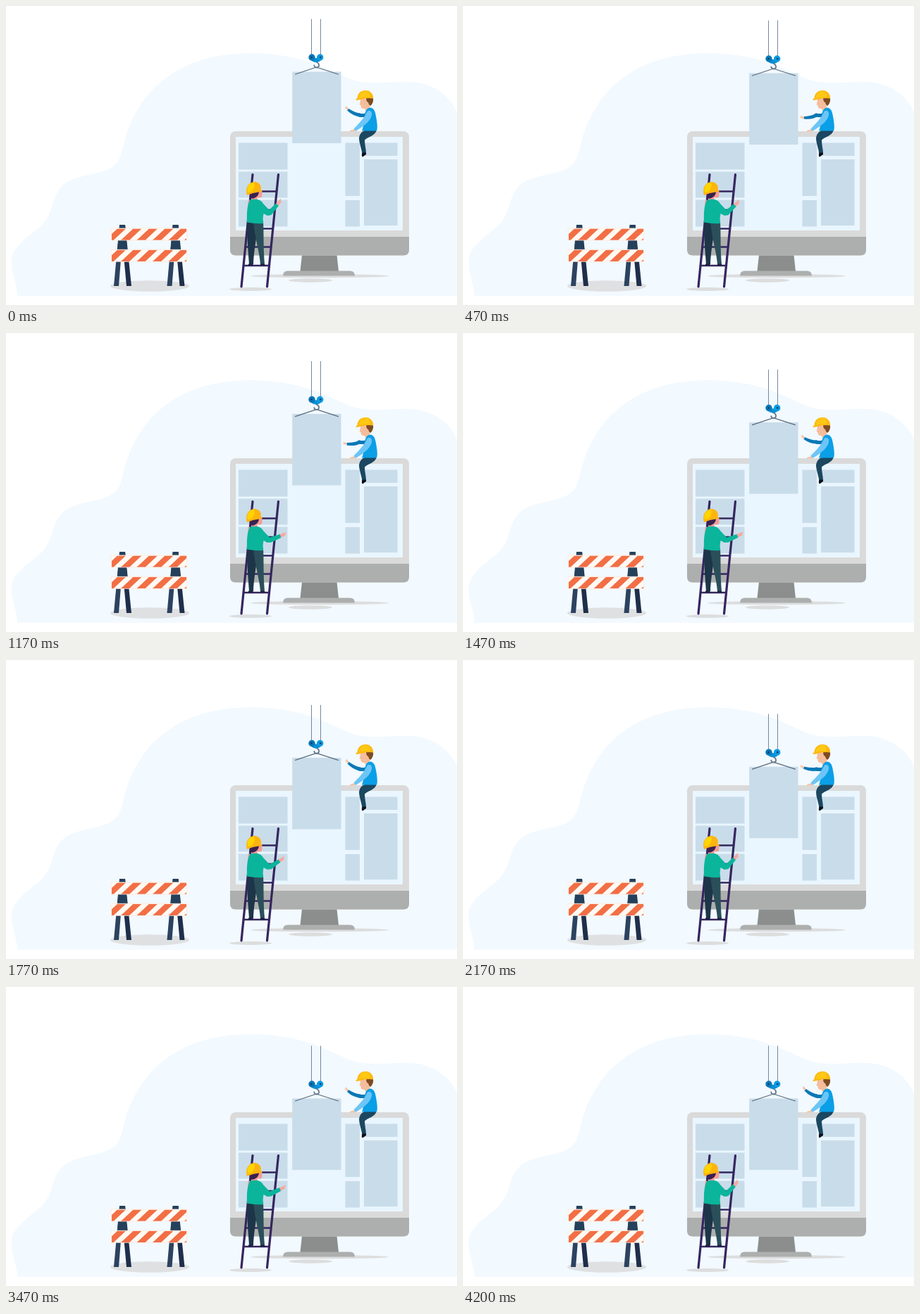
Animation of 640 by 425 pixels, one loop 4.36 s. Source, as an HTML page:

```html
<!DOCTYPE html>
<html lang="en">
<head>
<meta charset="utf-8">
<title>Building a page</title>
<style>
  html, body { margin: 0; width: 100%; height: 100%; overflow: hidden; background: #fff; }
  svg { display: block; width: 640px; height: 425px; }
</style>
</head>
<body>
<svg viewBox="0 0 640 425" fill="none" stroke-linecap="round" stroke-linejoin="round">
  <defs>
    <g id="legs">
      <path fill="#2c425f" d="M161 311H167L160 398H153Z"/>
      <path fill="#1f2e4a" d="M163 311H169L178 398H171Z"/>
      <path fill="#25405b" d="M161.500 311H169L172 347H158Z"/>
    </g>
    <clipPath id="boardClip"><path d="M150 316.500H256V332.500H150Z"/></clipPath>
    <g id="board">
      <path fill="#fffaf4" stroke="#fbe9d6" stroke-width=".8" d="M149.500 316H256.500V333H149.500Z"/>
      <g clip-path="url(#boardClip)">
        <path id="stripes" fill="#f26f46"/>
        <path stroke="#ea5238" stroke-width="1" stroke-dasharray="12 10.500" d="M141 332.300H256" stroke-linecap="butt"/>
      </g>
    </g>
  </defs>

  <path fill="#f2f9ff" d="M16 412C17 398 8 385 8 362C8 340 39 324 52 310C71 289 62 270 84 252C108 236 143 242 158 222C171 204 162 180 199 129C240 79 298 67 350 67C440 69 468 101 500 107C525 112 545 107 575 108C612 110 634 134 640 152V412Z"/>

  <!-- barrier -->
  <ellipse cx="204" cy="398" rx="56" ry="7.800" fill="#dfe0e1"/>
  <use href="#legs"/>
  <use href="#legs" x="75.500"/>
  <use href="#board"/>
  <use href="#board" y="30.300"/>

  <!-- monitor -->
  <g fill="#dcdddd">
    <ellipse cx="445" cy="383.700" rx="98" ry="2.600"/>
    <ellipse cx="432" cy="390" rx="31" ry="2.800"/>
    <ellipse cx="347" cy="402.500" rx="30" ry="2.500"/>
  </g>
  <path fill="#8b8e8d" d="M420 354H469.500L472 377H417.500Z"/>
  <path fill="#adafae" d="M393 383.500Q393 376.500 400 376.500H488Q495 376.500 495 383.500Z"/>
  <rect x="318" y="178" width="254" height="176.500" rx="8" fill="#dadada"/>
  <path fill="#adafae" d="M318 328H572V346.500Q572 354.500 564 354.500H326Q318 354.500 318 346.500Z"/>
  <path fill="#e9f6ff" d="M326 186H563V319H326Z"/>
  <path fill="#c9dcea" d="M330 194.500H399.500V232.500H330ZM330 235.500H399.500V272.500H330ZM330 275.500H399.500V313.500H330ZM481.500 194.500H502V270H481.500ZM481.500 276H502V313.500H481.500ZM508 194.500H555.500V213H508ZM508 218H555.500V312H508Z"/>

  <!-- crane load -->
  <g id="load">
    <path fill="#c9dcea" d="M406.200 93.500H475.500V195H406.200Z"/>
    <path stroke="#75889c" stroke-linecap="butt" d="M433.500 18.500V70M446.500 18.500V70"/>
    <path stroke="#596a7c" stroke-width="1.200" d="M410.500 97L440.500 87L471.500 97"/>
    <path stroke="#66788b" stroke-width="1.800" d="M440 79.500C445 81 445.500 87 441 87.500C438.500 87.500 437.500 86 437.300 84.500"/>
    <path fill="#0a8fd4" d="M432 76Q436 73 440 74Q444 73 448 76Q445 80 440 80Q435 80 432 76Z"/>
    <circle cx="434" cy="73" r="4.700" fill="#0878b8"/>
    <circle cx="445.700" cy="73" r="4.700" fill="#0a9be4"/>
    <path stroke="#14395c" stroke-width="2.600" d="M433.500 73h0M446.300 73h0"/>
  </g>

  <!-- seated man -->
  <path stroke="#0a78b6" stroke-width="5" d="M513 154Q508 156.500 501 155"/>
  <g id="manArm">
    <path fill="#0a78b6" d="M503 152.600Q497 152 486.500 144.800L484.500 147.500Q493 156.500 503 157.500Z"/>
    <path fill="#f8c4a4" d="M486.500 145L483.500 140.800L482.800 141.500L483 143L481 142.500L484.800 147.500Z"/>
  </g>
  <path fill="#1b4760" d="M526 176C524 185 513 186 509 190.500C509 198 511 203 511 210H505.500C504 201 501 194 501 187.500C502 181 506 177 512 176Z"/>
  <path fill="#0c0f1c" d="M505.500 208.500H511V211L506 214.500Q504 213.500 505.500 208.500Z"/>
  <path fill="#f5bd9b" d="M503 132Q503 137 501.500 140L503.500 141Q503 146.500 509 146L510 149L516 145L517 131Z"/>
  <path fill="#7d4b22" d="M511 130H521Q522 138 517 142Q515 141 514 137Q511 136 511 130Z"/>
  <path fill="#fdb913" d="M498.500 131C499 123 505 119.500 511 120C518 120.500 521.500 126 521 131.500C512 129.500 505 133 497 134Q495.500 132.500 498.500 131Z"/>
  <path fill="#ffc814" d="M501 129C502 123 507 120.500 513 121C516 123 517 127 516 129.500Q508 129 501 131Z"/>
  <path fill="#0a9fe6" d="M512 147C517 142 522 145 524 152C526 161 528 172 526 177.500H505C509 169 507 153 512 147Z"/>
  <path fill="#f8c4a4" d="M496 174.500L488 177L488 178.500H495Z"/>
  <path fill="#6cc5f6" d="M512.500 150C516 147 520 150 519 155C517 163 511 169 496 178L493.500 174.500C501 167 508 160 512.500 150Z"/>

  <!-- ladder -->
  <path stroke="#35265f" stroke-width="3.200" d="M350 239.500L334 399M386.500 239.500L370.500 399"/>
  <path stroke="#35265f" stroke-width="2.600" d="M348 263.500H384M345 290H381M342 316.500H378.500M340 342.500H376M337 369H373.500"/>

  <!-- climbing woman -->
  <path fill="#1d3548" d="M343 306H356C358 325 352 340 351 367H345C344 350 341 325 343 306Z"/>
  <path fill="#2b4f5a" d="M351 306H365C366 325 365 345 367 367H361C360 350 354 335 351 306Z"/>
  <path fill="#20213f" d="M344 366.500H350.500V369H344ZM361 366.500H366L369 369H361Z"/>
  <path fill="#f59c94" d="M353 262H363L363.500 266L363 271.500Q360 273 357 272L356 277H348Z"/>
  <path fill="#3a2150" d="M345.500 266L359 262.500Q359 269 355 271.500Q350 275 346.500 273Z"/>
  <path stroke="#f59c94" stroke-width="2.600" d="M345 276.500L344.500 282"/>
  <path fill="#0ab59b" d="M346 276C352 273.500 362 274 365 281L375 291.500Q377 297 371 298L365.500 295Q364 302 365 309Q354 310 342 307.500Q341 285 346 276Z"/>
  <path fill="#fdb40f" d="M342 269C339 259 344 250.500 352 250C359 250 363 255 361.500 261L364 263.500Q352 265 342 269Z"/>
  <path fill="#ffd400" d="M343 265C341 258 345 251.500 352 251C354 255 352 261 348 264.500Z"/>
  <g id="womanArm">
    <path fill="#f8a79d" d="M382.500 281.500L387 276.500L389.700 274L390.300 275L389.700 277.500L391 278.500L386 284.500Z"/>
    <path fill="#0ab59b" d="M371 292.300L383 280.500L386.800 284L377 296.500Q373 299 371 296Z"/>
  </g>
</svg>
<script>
  const LOOP = 4360;
  const byId = id => document.getElementById(id);
  const wave = x => (1 - Math.cos(Math.PI * x)) / 2;
  const ramp = (t, from, to) => Math.min(1, Math.max(0, (t - from) / (to - from)));
  const ease = (t, from, to) => wave(ramp(t, from, to));

  let stripes = '';
  for (let x = 141; x < 256; x += 22.5) stripes += `M${x} 332.5h12l17 -16h-12Z`;
  byId('stripes').setAttribute('d', stripes);

  // Both swings run from 0 (hand raised) to 1 (hand lowered).
  const manSwing = t => wave((Math.min(t, 3650) + 150) / 950);
  function womanSwing(t) {
    if (t < 1350) {
      const x = t / 1350;
      return x < .5 ? 4 * x ** 3 : 1 - 4 * (1 - x) ** 3;
    }
    return 1 - ease(t, 1350, 2280) + ease(t, 2280, 3230) - ease(t, 3230, 4200);
  }

  const move = (id, transform) => byId(id).setAttribute('transform', transform);

  function draw(now) {
    const t = now % LOOP;
    move('load', `translate(0 ${65 * ease(t, 190, 2700)})`);
    move('manArm', `rotate(${-55 * manSwing(t)} 502 155)`);
    move('womanArm', `rotate(${27 * womanSwing(t)} 374 295)`);
    requestAnimationFrame(draw);
  }
  draw(0);
</script>
</body>
</html>
```
